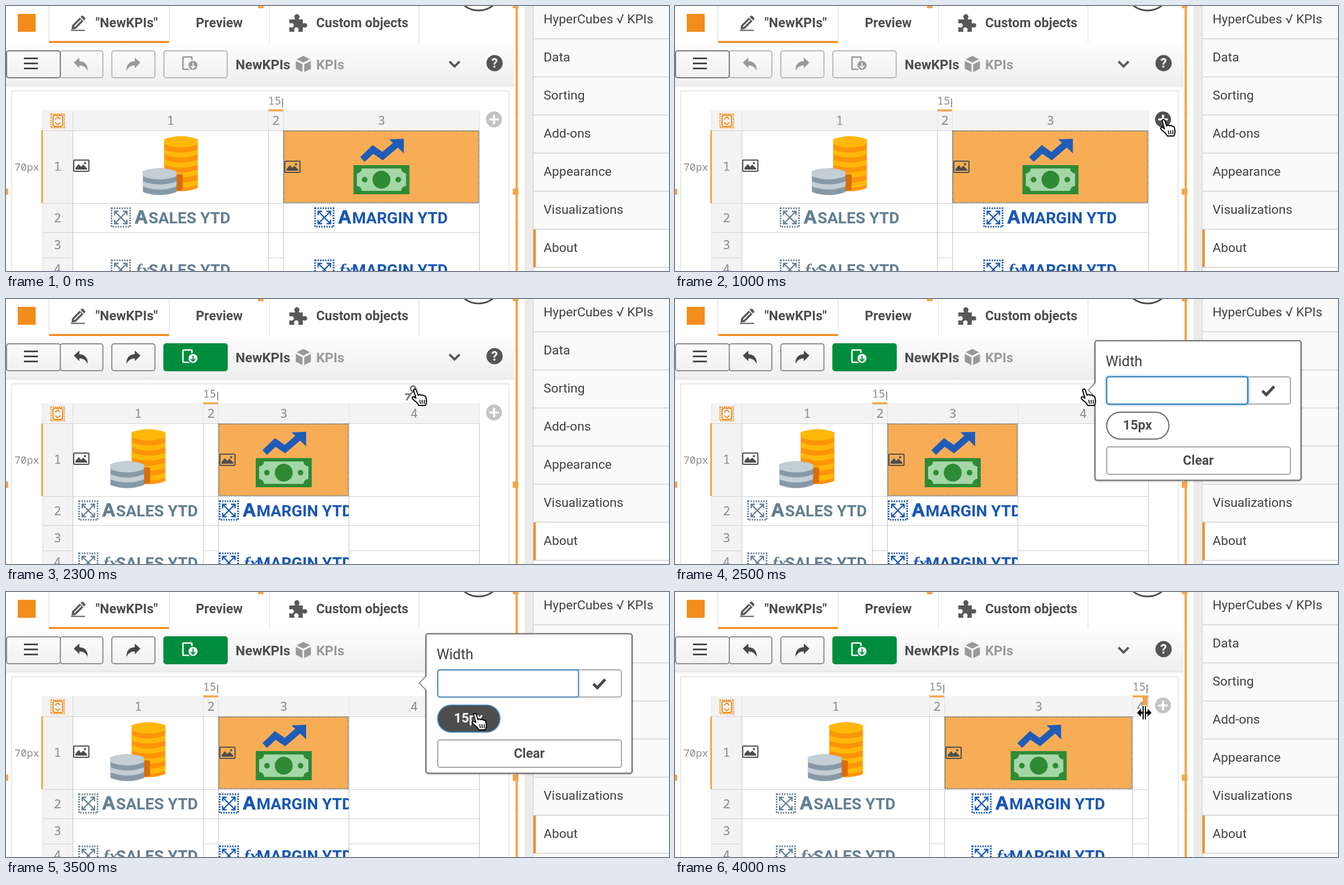
Animation, 1184 px wide and 473 px high, one loop 4100 ms. Source, as an HTML page:

```html
<!DOCTYPE html>
<html lang="en">
<head>
<meta charset="utf-8">
<title>Grid editor</title>
<style>
  html, body { margin: 0; width: 100%; height: 100%; overflow: hidden; background: #fff; }
  svg { display: block; }
  text { font-family: Roboto, "Open Sans", sans-serif; fill: #404040; }
  .b { font-weight: 700; fill: #4d4d4d; }
  .m { font-family: "Noto Sans Mono", "DejaVu Sans Mono", monospace; fill: #8a8a8a; }
  .c { text-anchor: middle; }
  .s { fill: none; }
</style>
</head>
<body>
<svg id="stage" width="1184" height="473" viewBox="0 0 1184 473"></svg>
<script>
const LOOP = 4100, STEP = 100;
const ADDED = 1200, OPENED = 2400, PRESSED = 3300, CLOSED = 3700;
const ORANGE = '#f5a54a', ACCENT = '#f28c1c', DARK = '#4d4d4d', LINE = '#cfcfcf';
const ROWS = [222, 352, 404, 449];
const LAYOUTS = [[119, 468, 495, 845], [119, 352, 379, 612, 845], [119, 454, 481, 817, 845]];

const rect = (x, y, w, h, fill, more = '') =>
  `<rect x="${x}" y="${y}" width="${w}" height="${h}" fill="${fill}" ${more}/>`;
const path = (d, fill, more = '') => `<path d="${d}" fill="${fill}" ${more}/>`;
const line = (d, color, width = 1, more = '') =>
  `<path class="s" d="${d}" stroke="${color}" stroke-width="${width}" ${more}/>`;
const text = (x, y, size, cls, str, more = '') =>
  `<text x="${x}" y="${y}" font-size="${size}" class="${cls}" ${more}>${str}</text>`;
const disc = (x, y, r, fill, more = '') => `<circle cx="${x}" cy="${y}" r="${r}" fill="${fill}" ${more}/>`;
const group = (body, more = '') => `<g ${more}>${body}</g>`;
const at = (x, y, body) => group(body, `transform="translate(${x} ${y})"`);
const clip = (x, y, w, h, body) => `<svg x="${x}" y="${y}" width="${w}" height="${h}">${body}</svg>`;

function tabs() {
  const pencil = group(
    path('M-11-4.500H12Q15-4.500 15-1.500V1.500Q15 4.500 12 4.500H-11L-17 0Z'.replaceAll('.500', '.5'), '#595959') +
    line('M-10 0H7', '#fff', 2.2) + line('M9.5-5V5', '#fff', 1.8),
    'transform="translate(129 30) rotate(-45)"') + line('M116 43.5H141', '#595959', 2);
  const puzzle =
    path('M506 24H516V22A4.5 4.5 0 1 1 523 22V24H530V31H532A4 4 0 1 1 532 38H530V46H522V44A4 4 0 1 0 515 44V46H506V38H508A4 4 0 1 0 508 31H506Z', '#585858');
  return rect(21, 14, 32, 32, ACCENT) +
    [76, 291, 470, 737].map(x => line(`M${x}.5 0V65`, '#d9d9d9')).join('') +
    rect(77, 62.5, 214, 3.5, ACCENT) + pencil + puzzle +
    text(160, 38, 23.6, 'b', '"NewKPIs"') + text(339, 38, 23.4, 'b', 'Preview') +
    text(554, 38, 23.4, 'b', 'Custom objects') +
    disc(844, -33.5, 41.5, 'none', `stroke="${DARK}" stroke-width="3"`);
}

function button(x, w, border, fill = 'none') {
  return rect(x, 80, w, 48, fill, `rx="4" stroke="${border}" stroke-width="2"`);
}

function buttons(active) {
  const ink = active ? '#484848' : '#999', border = active ? '#8c8c8c' : '#b8b8b8';
  const arrow = path('M-13-4L-3-13V-6.5Q12-6 12 11Q7 .5-3 1V6Z', ink);
  const save = active ? '#fff' : '#999', back = active ? '#008c3d' : '#f5f5f5';
  return button(97, 76, border) + button(189, 77, border) +
    button(282, 113, active ? back : border, active ? back : 'none') +
    button(1, 96, active ? '#8c8c8c' : '#777') +
    [92, 101, 110].map(y => rect(32, y, 25, 3, '#484848')).join('') +
    at(134, 105, arrow) + at(227, 105, group(arrow, 'transform="scale(-1 1)"')) +
    rect(316, 91, 16, 22, 'none', `rx="1" stroke="${save}" stroke-width="2.6"`) +
    disc(334, 106, 10, back) + disc(334, 106, 8, save) +
    line('M334 101V110 M330 107L334 111L338 107', back, 2);
}

function toolbar() {
  const cube = path('M0-15L12-9L0-3L-12-9Z M-13.5-6L-1.5 0V14L-13.5 8Z M13.5-6L1.5 0V14L13.5 8Z', '#999');
  return rect(0, 66, 908, 75, 'url(#bar)') + rect(0, 141, 908, 5, 'url(#shade)') +
    text(410, 113, 24, 'b', 'NewKPIs') + at(531, 104, cube) +
    text(554, 113, 24, 'b', 'KPIs', 'style="fill:#999"') +
    line('M792 99L801 108L810 99', '#595959', 4) +
    disc(872.5, 102, 14.5, '#555') + text(872.5, 110, 23, 'b c', '?', 'style="fill:#fff"');
}

function sidePanel() {
  const names = ['HyperCubes √ KPIs', 'Data', 'Sorting', 'Add-ons', 'Appearance', 'Visualizations', 'About'];
  return rect(926, 0, 16, 473, '#ebebeb') + rect(942, 0, 242, 473, '#fafafa') +
    rect(942, 399, 242, 67, '#fff') + line('M941.5 0V473', LINE) +
    names.map((n, i) => line(`M942 ${58.5 + 68 * i}H1184`, LINE, 1.3) +
      text(960, 31 + 68 * i, 22.9, '', n)).join('') +
    rect(942, 399, 4, 67, ACCENT);
}

function frameMarks() {
  return [92, 190, 289, 387].map(y => line(`M908 ${y}H917`, '#ddd')).join('') +
    rect(910, 0, 4, 473, ORANGE) + rect(905, 326, 10, 11, ORANGE) + rect(0, 326, 4, 11, ORANGE) +
    rect(450, 0, 10, 4, ORANGE) + rect(905, 0, 10, 4, ORANGE);
}

// A pile of coins seen from the side: curved bands on a rounded column.
function pile(x, top, bottom, light, dark) {
  let out = path(`M${x} ${top}q30-11 60 0V${bottom}q-30 11-60 0Z`, dark);
  out += path(`M${x} ${top}q30-11 60 0v9q-30 11-60 0Z`, light);
  for (let y = top + 18; y < bottom - 5; y += 18)
    out += path(`M${x} ${y}q30 11 60 0v9q-30 11-60 0Z`, light);
  return out;
}

const coins = () => pile(-11, 238, 325, '#ffb80a', '#ff9408') +
  path('M10 301Q22 299 22 303V327Q17 331 10 330Z', '#d96c0b') +
  pile(-49, 295, 332, '#c3ced5', '#8799a6');

const money = () =>
  line('M-34 274L-15 256L2 268L29 245', '#1f5cb8', 12) +
  path('M14 238L40 237V263Z', '#1f5cb8') +
  rect(-50, 284, 100, 52, '#2f8a35') +
  path('M-35 290H35Q36 298 44 299V321Q36 322 35 330H-35Q-36 322-44 321V299Q-36 298-35 290Z', '#a3d7a6') +
  disc(0, 310, 16, '#2f8a35') + disc(-30, 310, 5, '#2f8a35') + disc(30, 310, 5, '#2f8a35');

const picture = () =>
  rect(1, 1, 27, 20, 'none', `stroke="${DARK}" stroke-width="2" rx="1"`) +
  path('M4 18V15L10 8L14 13L18 9L25 16V18Z', DARK) + disc(21, 6.5, 2, DARK);

function label(str, color, isFormula) {
  const paint = `style="fill:${color}"`;
  return rect(1.5, 1.5, 33, 33, 'none', `stroke="${color}" stroke-width="3" stroke-dasharray="2.4 2.1"`) +
    line('M8 8L28 28 M28 8L8 28', color, 2.4) +
    line('M7 14V7H14 M22 7H29V14 M29 22V29H22 M14 29H7V22', color, 2.4) +
    (isFormula
      ? text(45, 28, 30, '', 'fx', `style="fill:${color};font:italic 700 30px 'Liberation Serif',serif"`)
      : text(42.5, 28.5, 33, '', 'A', `style="fill:${color};stroke:${color};font:700 33px 'Liberation Sans',sans-serif"`)) +
    text(67.5, 28.5, 28.4, 'b', str, paint);
}

function grid(cols) {
  const mid = i => (cols[i] + cols[i + 1]) / 2, width = i => cols[i + 1] - cols[i];
  const end = 845;
  let out = rect(65, 186, end - 65, 36, '#f3f3f3') + rect(65, 222, 54, 251, '#f3f3f3') +
    line('M65.5 186V473', '#ddd');
  for (const y of ROWS.slice(0, 3)) out += line(`M65 ${y}.5H${end}`, LINE);
  out += line('M65 449.5H119', LINE);

  for (let i = 0; i < cols.length - 1; i++) {
    out += text(mid(i) + .5, 212, 22.5, 'm c', i + 1);
    if (i % 2) out += line(`M${cols[i]} 449.5H${cols[i + 1]}`, LINE);
    if (width(i) < 30)
      out += rect(cols[i], 184.5, width(i), 3.5, ORANGE) +
        clip(cols[i], 150, width(i), 34, text(0, 26, 19.5, 'm', '15px'));
  }
  out += cols.map(x => line(`M${x + .5} 186V222`, '#e2e2e2') + line(`M${x + .5} 222V473`, '#c2c2c2')).join('');

  out += at(mid(0), 0, coins()) + at(120, 274, picture());
  out += rect(cols[2] + 1, 223, width(2) - 2, 128, '#f7ad55', 'stroke="#374b68" stroke-width="1.5" stroke-dasharray="1.6 1.6"') +
    at(mid(2) + .5, 0, money()) + at(cols[2] + 2, 276, picture());

  for (const [col, str, color, w] of [[0, 'SALES YTD', '#647f91', 213], [2, 'MARGIN YTD', '#1856b4', 239]]) {
    const x = Math.max(1, (width(col) - w) / 2);
    out += clip(cols[col], 353, width(col), 120,
      at(x, 6.5, label(str, color, false)) + at(x, 99.5, label(str, color, true)));
  }
  return out;
}

function gridFrame() {
  return line('M10 473V151.5H898.5V473', '#dedede', 1.3) +
    text(15, 294, 18.5, 'm', '70px');
}

function gridMarks() {
  return [294, 386, 434, 477].map((y, i) => text(92, y, 22.5, 'm c', i + 1)).join('') +
    rect(63, 222, 3, 130, ORANGE) +
    rect(80.5, 193, 23.5, 24, 'none', `stroke="${ACCENT}" stroke-width="2.4" stroke-dasharray="2 1.6"`) +
    rect(84, 195, 17, 20, 'none', `rx="3" stroke="${ACCENT}" stroke-width="2"`) +
    line('M88 202L92.5 198L97 202 M88 208L92.5 212L97 208', ACCENT, 1.8);
}

function popup() {
  const box = (x, y, w, h, color, rx, more = '') =>
    rect(x, y, w, h, '#fff', `rx="${rx}" stroke="${color}" stroke-width="2" ${more}`);
  return box(750, 74.5, 368, 249, '#666', 4, 'filter="url(#soft)"') +
    path('M752 149L738 162.5L752 176Z', '#fff') + line('M750 150L738 162.5L750 175', '#777', 1.6) +
    text(769, 120, 25.5, '', 'Width') +
    box(771, 139, 328, 48.5, '#a6a6a6', 4) +
    line('M1049 164L1056 171L1070 156', '#484848', 5) +
    group(box(771, 139, 252, 48.5, '#2f84c4', 4, 'filter="url(#glow)"'), 'id="focus"') +
    box(771, 139, 251.5, 48.5, '#3d80b3', 4) +
    rect(771, 202, 111, 48, '#fff', 'id="pill" rx="24" stroke="#666" stroke-width="2"') +
    text(800, 233, 23.4, 'b', '15px', 'id="pillText"') +
    box(771, 264, 328, 49, '#a6a6a6', 4) + text(934.5, 296, 23.4, 'b c', 'Clear');
}

const pin = () => disc(727, 160, 4.5, 'none', 'stroke="#777" stroke-width="3"') +
  line('M713 170H722L728 164 M722 170L715 181 M733 164V179', '#777', 3);

const hand = () => path(
  'M-3 1C-3-2 1-2 2 1L5 10Q8 7 10 10Q13 8 15 11Q18 10 19 14L20 20Q20 24 18 28H6Q4 23-2 19Q-7 15-5 13Q-3 11 1 15Z',
  '#fff', 'stroke="#000" stroke-width="2" stroke-linejoin="round"') +
  line('M8 18L9 25 M12 18L12.5 25 M16 18V25', '#000', 1.6);

const resizer = () => {
  const shape = 'M-3-12H-1V12H-3Z M1-12H3V12H1Z M-13 0L-6-7V-2H-3V2H-6V7Z M13 0L6-7V-2H3V2H6V7Z';
  return path(shape, '#000', 'stroke="#fff" stroke-width="3" stroke-linejoin="round"') + path(shape, '#000');
};

const defs = `<defs>
  <linearGradient id="bar" x2="0" y2="1"><stop stop-color="#fdfdfd"/><stop offset="1" stop-color="#efefef"/></linearGradient>
  <linearGradient id="shade" x2="0" y2="1"><stop stop-color="#e3e3e3"/><stop offset="1" stop-color="#fff"/></linearGradient>
  <filter id="soft"><feDropShadow dx="0" dy="1" stdDeviation="1.5" flood-opacity=".3"/></filter>
  <filter id="glow"><feDropShadow dx="0" dy="0" stdDeviation="2" flood-color="#3b93d6"/></filter>
</defs>`;

const stage = document.getElementById('stage');
stage.innerHTML = defs + rect(0, 0, 1184, 473, '#fff') + toolbar() + tabs() +
  group(buttons(false), 'id="idle"') + group(buttons(true), 'id="live"') +
  gridFrame() + LAYOUTS.map((cols, i) => group(grid(cols), `id="grid${i}"`)).join('') + gridMarks() +
  disc(871.5, 202.5, 14.3, '#c4c4c4', 'id="plus"') + line('M863 202.5H880 M871.5 194V211', '#fff', 3.6) +
  sidePanel() + frameMarks() +
  group(pin(), 'id="pin"') + rect(835, 188, 9, 18, ORANGE, 'id="handle"') +
  group(popup(), 'id="popup"') + group(hand(), 'id="hand"') +
  group(at(838, 215.5, resizer()), 'id="resizer"');

const el = Object.fromEntries([...stage.querySelectorAll('[id]')].map(n => [n.id, n]));
const show = (id, on) => { el[id].style.display = on ? '' : 'none'; };

// Pointer stops: time, x, y
const TRACK = [
  [200, 1095, 473], [700, 873, 204], [1200, 873, 204], [1500, 799, 192],
  [1900, 731, 162], [2500, 731, 162], [2800, 838, 218], [3700, 838, 218]
];

function pointer(t) {
  const i = Math.max(1, TRACK.findIndex(k => k[0] >= t));
  const [t0, x0, y0] = TRACK[i - 1], [t1, x1, y1] = TRACK[i];
  const u = Math.min(1, Math.max(0, (t - t0) / (t1 - t0))), e = u * u * (3 - 2 * u);
  return [x0 + (x1 - x0) * e, y0 + (y1 - y0) * e];
}

function draw(t) {
  const phase = t < ADDED ? 0 : t < CLOSED ? 1 : 2;
  const pressed = t >= PRESSED && t < CLOSED;
  LAYOUTS.forEach((_, i) => show('grid' + i, i === phase));
  show('idle', phase === 0);
  show('live', phase > 0);
  show('pin', t >= 1800 && t < OPENED);
  show('popup', t >= OPENED && t < CLOSED);
  show('focus', !pressed);
  show('handle', phase === 2);
  show('resizer', phase === 2);
  show('hand', t >= 200 && t < CLOSED);
  const hover = t < ADDED ? '#505050' : '#626262';
  el.plus.setAttribute('fill', t >= 700 && t < 1600 ? hover : '#c4c4c4');
  el.pill.setAttribute('fill', pressed ? DARK : '#fff');
  el.pill.setAttribute('stroke', pressed ? '#3d80b3' : '#666');
  el.pillText.style.fill = pressed ? '#fff' : DARK;
  if (t < CLOSED) el.hand.setAttribute('transform', `translate(${pointer(t)})`);
}

const start = performance.now();
function tick() {
  const t = (performance.now() - start) % LOOP;
  draw(Math.floor(t / STEP) * STEP);
  requestAnimationFrame(tick);
}
tick();
</script>
</body>
</html>
```
